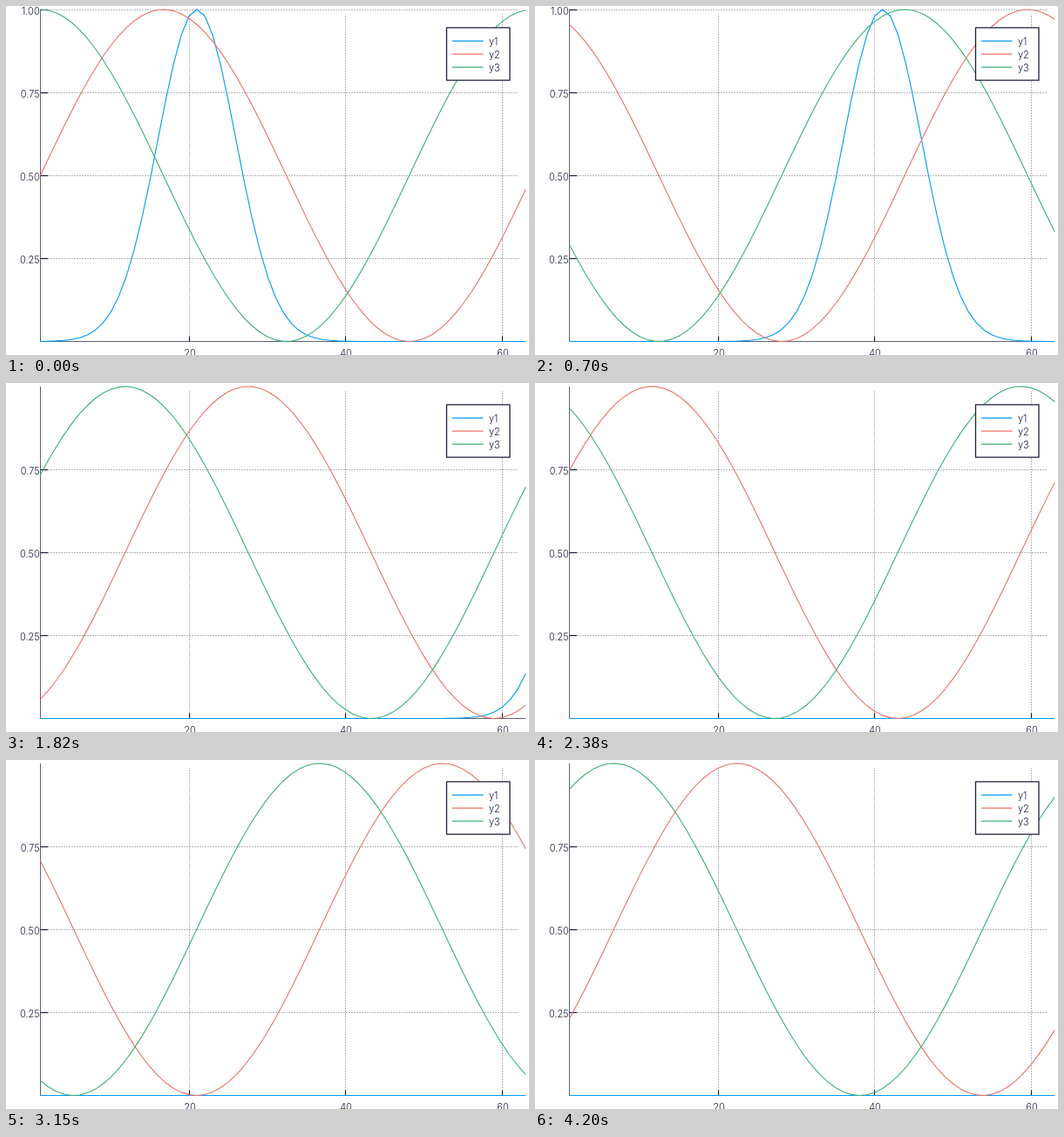
Animation, 600 px wide and 400 px high, one loop 4270 ms. Source, as an HTML page with a canvas:

```html
<!DOCTYPE html>
<html lang="en">
<head>
<meta charset="utf-8">
<title>Moving pulse and waves</title>
<style>
  html, body { margin: 0; width: 100%; height: 100%; overflow: hidden; background: #fff; }
  canvas { display: block; }
</style>
</head>
<body>
<canvas id="plot" width="600" height="400"></canvas>
<script>
const ctx = document.getElementById('plot').getContext('2d');
const STEP_MS = 70, STEPS = 61, POINTS = 63;
const RIGHT = 596.2, TOP = 4, BOTTOM = 384.5;
const INK = '#1c1c3c';

const series = [
  { name: 'y1', color: '#009afa', at: (v, s) => Math.exp(-2 * (v - 2 - s) ** 2) },
  { name: 'y2', color: '#ec7266', at: (v, s) => (1 + Math.sin(v + s)) / 2 },
  { name: 'y3', color: '#3cb072', at: (v, s) => (1 + Math.cos(v + s)) / 2 },
];

function path(points, color, width = 1, dash = []) {
  ctx.beginPath();
  points.forEach(([x, y]) => ctx.lineTo(x, y));
  ctx.strokeStyle = color;
  ctx.lineWidth = width;
  ctx.setLineDash(dash);
  ctx.stroke();
}

function label(text, x, y, align) {
  ctx.fillStyle = INK;
  ctx.textAlign = align;
  ctx.fillText(text, x, y + 4.5);
}

const crisp = p => Math.floor(p) + 0.5;

function drawAxes(left, toX, toY, max, step) {
  const xTicks = [20, 40, 60], yTicks = [];
  for (let i = 1; i * step <= max + 1e-9; i++) yTicks.push(i * step);
  const dots = 'rgba(28,28,60,.65)', axis = 'rgba(28,28,60,.7)';

  for (const t of xTicks) {
    const x = crisp(toX(t));
    path([[x, BOTTOM], [x, 9]], dots, 1, [1, 2]);
    path([[x, BOTTOM], [x, 378.5]], INK, 1.2);
    label(t, x + 0.5, 397, 'center');
  }
  for (const t of yTicks) {
    const y = crisp(toY(t));
    path([[left, y], [587, y]], dots, 1, [1, 2]);
    path([[left, y], [left + 8.5, y]], INK, 1.2);
    label(t.toFixed(step === 0.2 ? 1 : 2), left - 0.8, y + 0.5, 'right');
  }
  path([[left, TOP], [left, BOTTOM], [RIGHT, BOTTOM]], axis);
}

function drawLegend() {
  ctx.fillStyle = '#fff';
  ctx.fillRect(505.5, 24.8, 72.5, 60.4);
  ctx.setLineDash([]);
  ctx.strokeStyle = INK;
  ctx.lineWidth = 1.3;
  ctx.strokeRect(505.5, 24.8, 72.5, 60.4);
  series.forEach(({ name, color }, i) => {
    const y = 40.2 + 15 * i;
    path([[512, y], [547.5, y]], color, 1.2);
    label(name, 554, y + 0.3, 'left');
  });
}

function draw(k) {
  const shift = 0.2 * k;
  const data = series.map(s =>
    Array.from({ length: POINTS }, (_, i) => s.at(i / 10, shift)));
  const min = Math.min(...data.flat()), max = Math.max(...data.flat());

  // The axis switches to finer ticks while the data span exactly 0 to 1.
  const fine = k >= 12 && k <= 21;
  const left = fine ? 30.5 : 39.5;
  const toX = n => left + (n - 1) * (RIGHT - left) / (POINTS - 1);
  const toY = v => BOTTOM - (v - min) / (max - min) * (BOTTOM - TOP);

  ctx.fillStyle = '#fff';
  ctx.fillRect(0, 0, 600, 400);
  ctx.font = '300 11px Inter, "Open Sans", sans-serif';
  ctx.lineJoin = 'round';
  drawAxes(left, toX, toY, max, fine ? 0.2 : 0.25);
  data.forEach((ys, j) =>
    path(ys.map((v, i) => [toX(i + 1), toY(v)]), series[j].color, 1.1));
  drawLegend();
}

const start = performance.now();
function tick() {
  draw(Math.floor((performance.now() - start) / STEP_MS) % STEPS);
  requestAnimationFrame(tick);
}
tick();
</script>
</body>
</html>
```
